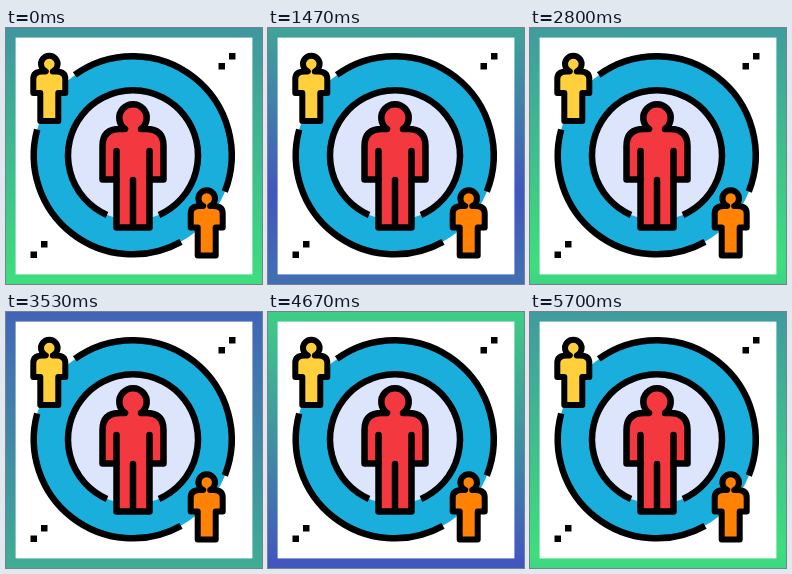
Animation, 256 px wide and 256 px high, one loop 5760 ms. Source, as an HTML page:

```html
<!DOCTYPE html>
<html lang="en">
<head>
<meta charset="utf-8">
<title>Circle of people</title>
<style>
html, body { margin: 0; width: 100%; height: 100%; overflow: hidden; }
svg { display: block; width: 100%; height: 100%; }
</style>
</head>
<body>
<svg viewBox="0 0 256 256">
  <defs>
    <linearGradient id="glow" gradientUnits="userSpaceOnUse" x1="0" y1="0" x2="0" y2="768" spreadMethod="repeat">
      <stop offset="0" stop-color="#3ede7e"/>
      <stop offset=".37" stop-color="#4256be"/>
      <stop offset="1" stop-color="#3ede7e"/>
    </linearGradient>
    <path id="small" d="M-3.500 7.500H-7Q-16 7.500 -16 15V29H-9V57H9V29H16V15Q16 7.500 7 7.500H3.500A8.300 8.300 0 1 0 -3.500 7.500Z"/>
    <path id="dot" d="M0 0h6.500v6.500h-6.500z"/>
  </defs>
  <rect width="256" height="256" fill="url(#glow)"/>
  <rect x="9.600" y="9.600" width="236.800" height="236.800" fill="#fff"/>

  <circle cx="126.800" cy="127.300" r="99" fill="#1aaedd"/>
  <circle cx="127" cy="127.300" r="65" fill="#dce5fb"/>
  <g fill="none" stroke="#000" stroke-width="6.500">
    <path d="M68.800 46.900A99 99 0 0 1 218.800 163.500"/>
    <path d="M31.200 101.500A99 99 0 0 0 175 213.800"/>
    <path d="M101 186.900A65 65 0 1 1 153 186.900"/>
  </g>

  <g stroke="#000" stroke-width="6.500" stroke-linejoin="round" stroke-linecap="round">
    <path fill="#f3393f" d="M119 101H114Q96.500 101 96.500 118V151.500H110.500V199.500H143.500V151.500H157.500V118Q157.500 101 140 101H135A13.700 13.700 0 1 0 119 101Z"/>
    <path fill="none" d="M110.500 123V151M143.500 123V151M127 152V199"/>
    <g stroke-width="6">
      <use href="#small" x="43.300" y="36" fill="#ffd03b"/>
      <use href="#small" x="200.700" y="170.500" fill="#ff8205"/>
    </g>
  </g>

  <use href="#dot" x="223" y="25"/>
  <use href="#dot" x="212.500" y="35"/>
  <use href="#dot" x="35" y="213"/>
  <use href="#dot" x="24.500" y="223.500"/>
</svg>
<script>
const CYCLE = 2880, SIZE = 256, SPAN = 3 * SIZE;
const glow = document.getElementById('glow');

// The border gradient scrolls down by its whole span in each cycle.
function draw(ms) {
  const y = SIZE + SPAN * (ms % CYCLE) / CYCLE;
  glow.setAttribute('gradientTransform', `translate(0 ${y.toFixed(2)})`);
}

const start = performance.now();
function tick() {
  draw(performance.now() - start);
  requestAnimationFrame(tick);
}
tick();
</script>
</body>
</html>
```
